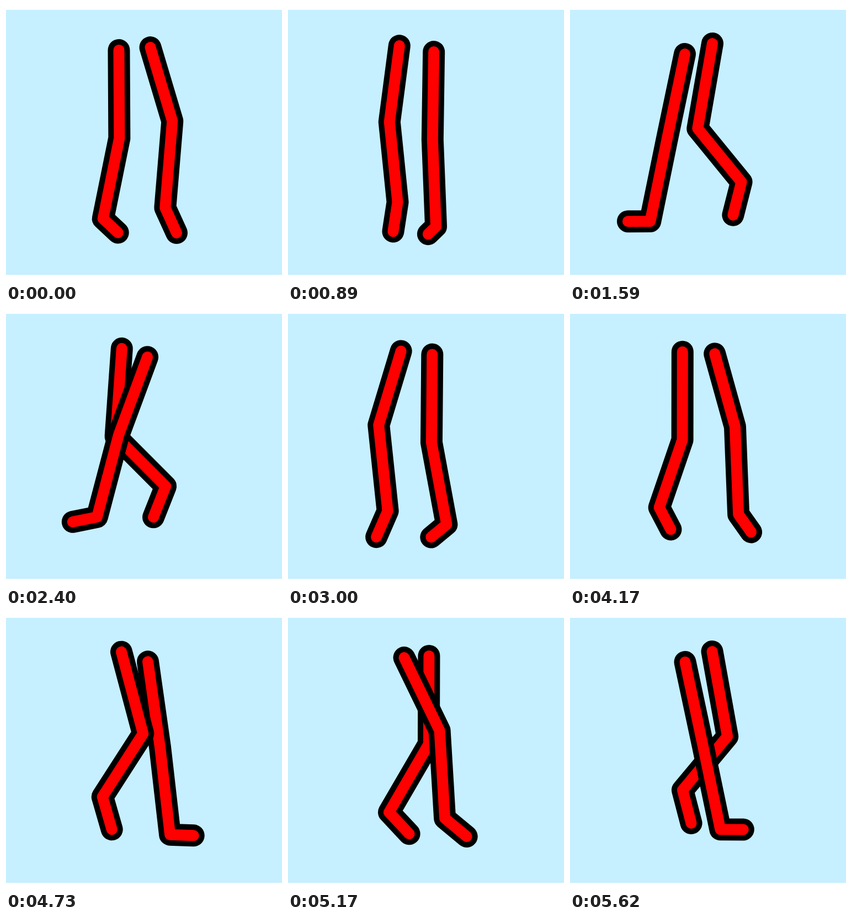
An HTML page for the animation above (5.72 s loop, 500 px wide and 500 px high).

```html
<!DOCTYPE html>
<html lang="en">
<head>
<meta charset="utf-8">
<title>Walking legs</title>
<style>
  html, body { margin: 0; width: 100%; height: 100%; overflow: hidden; background: #fff; }
  svg { display: block; width: 100%; height: 100%; }
  polyline { fill: none; stroke-linecap: round; stroke-linejoin: round; }
  .edge { stroke: #000; stroke-width: 40; }
  .skin { stroke: #f00; stroke-width: 20; }
</style>
</head>
<body>
<svg viewBox="0 0 500 500">
  <rect y="7" width="500" height="480" fill="#c6efff"/>
  <g><polyline class="edge"/><polyline class="skin"/></g>
  <g><polyline class="edge"/><polyline class="skin"/></g>
</svg>
<script>
const LOOP = 5720;
const SPEED = 0.0596;          // turn of the body, degrees per ms
const STEPS = 3;               // walk cycles per full turn
const BONE = 159.6, FOOT = 64.5, HIP = 32;
const rad = Math.PI / 180;
const sin = d => Math.sin(d * rad);
const cos = d => Math.cos(d * rad);
const legs = [...document.querySelectorAll('g')];

// Joints of one leg, swung in its walking plane and seen turned by yaw
function legPoints(side, phase, yaw) {
  const thigh = 17 - 17.3 * sin(phase - 4.5);
  const shin = Math.min(thigh, -17.2 + 38.8 * cos(phase + 25));
  const foot = 56 + 34 * cos(phase - 4);
  let x = 233 + side * HIP * cos(yaw);
  let y = 77.5 + 9.5 * cos(phase);
  const points = [[x, y]];
  for (const [length, angle] of [[BONE, thigh], [BONE, shin], [FOOT, foot]]) {
    x += length * sin(angle) * sin(yaw);
    y += length * cos(angle);
    points.push([x, y]);
  }
  return points.map(p => p.map(v => v.toFixed(2)).join()).join(' ');
}

function draw(t) {
  const turn = SPEED * t;
  const phase = 75 + STEPS * turn;
  const yaw = 45.5 * sin(36.5 - turn);
  const far = yaw < 0 ? -1 : 1;  // the nearer leg is painted last
  [far, -far].forEach((side, i) => {
    const points = legPoints(side, side < 0 ? phase : phase + 180, yaw);
    for (const line of legs[i].children) line.setAttribute('points', points);
  });
}

const start = performance.now();
function tick() {
  draw((performance.now() - start) % LOOP);
  requestAnimationFrame(tick);
}
tick();
</script>
</body>
</html>
```
